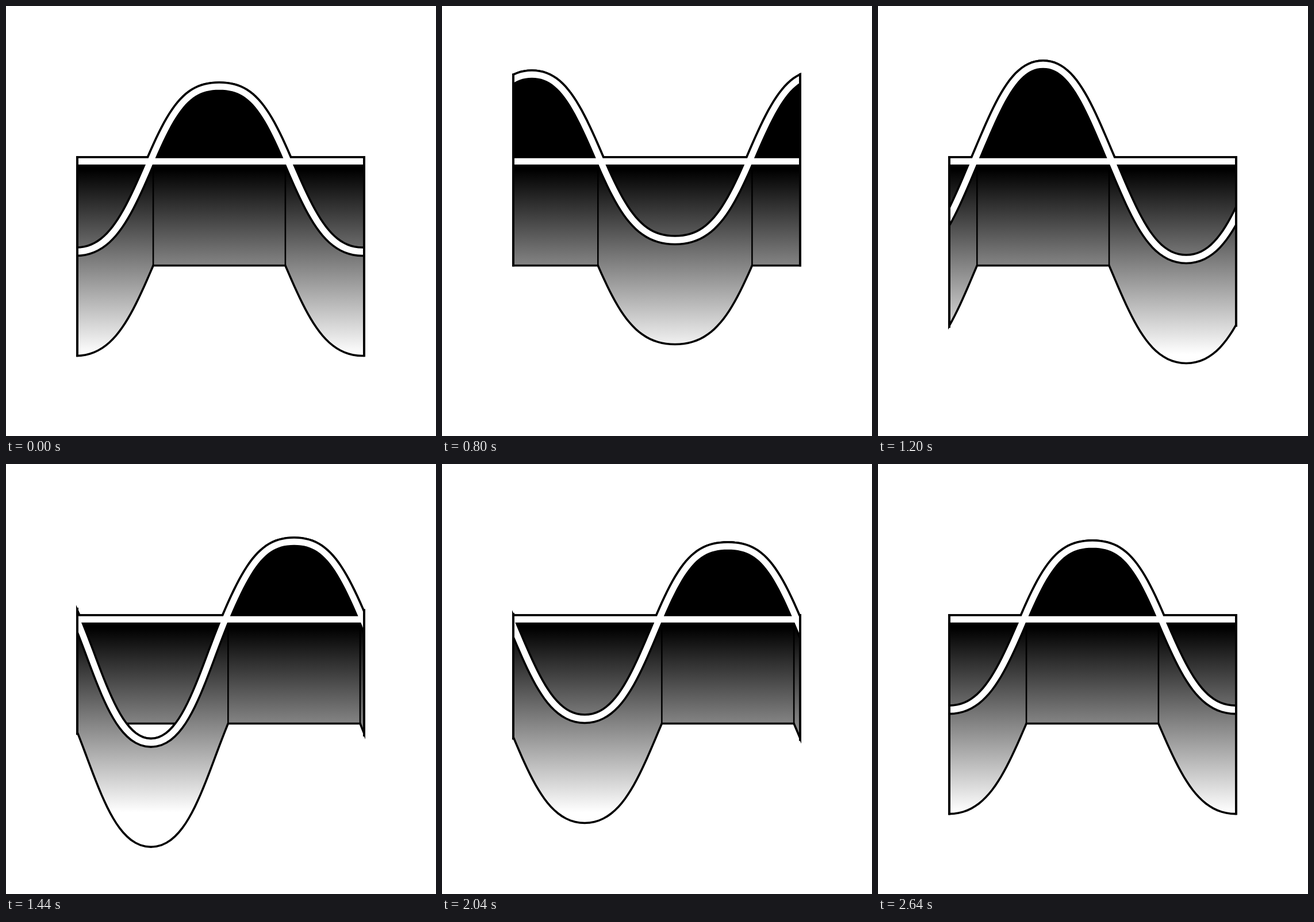
An HTML page that plays this animation: 748x748 px, repeating every 2.68 s.

```html
<!DOCTYPE html>
<html lang="en">
<head>
<meta charset="utf-8">
<title>Wave</title>
<style>
html, body { margin: 0; width: 100%; height: 100%; overflow: hidden; background: #fff; }
svg { display: block; width: 100vw; height: 100vh; }
</style>
</head>
<body>
<svg viewBox="0 0 748 748">
  <defs>
    <linearGradient id="shade" gradientUnits="userSpaceOnUse" x1="0" y1="285" x2="0" y2="606">
      <stop offset="0" stop-color="#000"/>
      <stop offset="1" stop-color="#fff"/>
    </linearGradient>
    <clipPath id="frame"><rect x="122" y="0" width="503" height="748"/></clipPath>
  </defs>
  <g clip-path="url(#frame)">
    <path id="bodyLine"/>
    <path id="bodyFill" fill="url(#shade)"/>
    <path id="folds" stroke="#000" stroke-width="2.6"/>
    <path id="bandLine"/>
    <path id="bandFill" fill="#fff"/>
    <path id="sides" stroke="#000" stroke-width="4"/>
  </g>
</svg>
<script>
const STEP = 40, STEPS = 67;
const LEFT = 124, RIGHT = 623, SPAN = 498, QUARTER = SPAN / 4;
const TOP = 263, THICK = 14.5, DROP = 174, HALF = 1.8;
const BASE = TOP + THICK + DROP;
// Bezier handles of a quarter wave: at the crossing and at the extreme
const RUN = 0.326 * QUARTER, RISE = 2.35 * RUN, REACH = 0.55 * QUARTER;

// [step, height] of the crest and depth of the trough
const CREST = [[0, 130], [10, 134], [20, 151], [28, 178], [30, 168], [36, 135], [42, 119], [51, 127], [60, 130], [67, 130]];
const TROUGH = [[0, 157], [10, 152], [20, 137], [26, 177], [30, 170], [37, 219], [42, 205], [51, 173], [60, 161], [67, 157]];

const el = id => document.getElementById(id);
const set = (id, d) => el(id).setAttribute('d', d);

function spline(keys, t) {
  const last = keys.length - 1;
  let i = 0;
  while (i < last - 1 && t >= keys[i + 1][0]) i++;
  const slope = j => j === 0 || j === last ? 0 :
    (keys[j + 1][1] - keys[j - 1][1]) / (keys[j + 1][0] - keys[j - 1][0]);
  const [t0, a] = keys[i], [t1, b] = keys[i + 1];
  const h = t1 - t0, s = (t - t0) / h, r = 1 - s;
  return a * (1 + 2 * s) * r * r + b * s * s * (3 - 2 * s) +
    h * s * r * (slope(i) * r - slope(i + 1) * s);
}

// Three wavelengths to the left per loop, slow at both ends
function crestX(n) {
  const a = 2 * Math.PI * n / STEPS;
  return 371 - (3 * SPAN * n / STEPS - 236 * Math.sin(a) + 14 * Math.sin(2 * a) - 3 * Math.sin(3 * a));
}

const bezier = (s, p1, p2, p3) => {
  const r = 1 - s;
  return 3 * r * r * s * p1 + 3 * r * s * s * p2 + s * s * s * p3;
};
const bezierSlope = (s, p1, p2, p3) => {
  const r = 1 - s;
  return 3 * (r * r * p1 + 2 * r * s * (p2 - p1) + s * s * (p3 - p2));
};

// One half wave as points [x, y, slope], s running -1..1 around its extreme
function lobe(mid, size, sign) {
  const pts = [];
  for (let i = -24; i < 24; i++) {
    const side = i < 0 ? 1 : -1, s = 1 - Math.abs(i / 24);
    const x = mid - side * (QUARTER - bezier(s, RUN, REACH, QUARTER));
    const dx = bezierSlope(s, RUN, REACH, QUARTER), dy = bezierSlope(s, RISE, size, size);
    pts.push([x, TOP + sign * bezier(s, RISE, size, size), side * sign * dy / dx]);
  }
  return pts;
}

function curve(n) {
  const up = spline(CREST, n), down = spline(TROUGH, n);
  const start = LEFT - 2 * SPAN + ((crestX(n) - LEFT) % SPAN + SPAN) % SPAN;
  const pts = [];
  for (let x = start; x < RIGHT + SPAN; x += SPAN) {
    pts.push(...lobe(x, up, -1), ...lobe(x + SPAN / 2, down, 1));
  }
  return pts;
}

// The curve pushed along its normal by d, then lowered by dy
const edge = (wave, d, dy = 0) => wave.map(([x, y, m]) => {
  const len = Math.hypot(1, m);
  return [x - d * m / len, y + d / len + dy];
});

const polygon = pts => 'M' + pts.map(p => p[0].toFixed(2) + ' ' + p[1].toFixed(2)).join('L') + 'Z';
const strip = (wave, a, b, dy = 0) => polygon(edge(wave, a).concat(edge(wave, b, dy).reverse()));
// Clockwise like strip, so that overlaps stay filled
const box = (y0, y1) => `M${LEFT - 2} ${y0}H${RIGHT + 2}V${y1}H${LEFT - 2}Z`;
const line = (x, y0, y1) => `M${x} ${y0}V${y1}`;

function yAt(pts, x) {
  let i = 1;
  while (i < pts.length - 1 && pts[i][0] < x) i++;
  const [x0, y0] = pts[i - 1], [x1, y1] = pts[i];
  return y0 + (y1 - y0) * (x - x0) / (x1 - x0);
}

function crossings(pts, y) {
  const out = [];
  for (let i = 1; i < pts.length; i++) {
    const [x0, y0] = pts[i - 1], [x1, y1] = pts[i];
    if ((y0 < y) !== (y1 < y)) out.push(x0 + (x1 - x0) * (y - y0) / (y1 - y0));
  }
  return out.filter(x => x > LEFT && x < RIGHT);
}

function draw(n) {
  const wave = curve(n);
  const inner = THICK - HALF, outer = THICK + HALF;

  set('bodyLine', strip(wave, -HALF, outer, DROP) + box(TOP - HALF, BASE + HALF));
  set('bodyFill', strip(wave, HALF, inner, DROP) + box(TOP + HALF, BASE - HALF));

  const bottom = edge(wave, THICK, DROP);
  set('folds', crossings(bottom, BASE).map(x => line(x, TOP + THICK, BASE)).join(''));

  set('bandLine', strip(wave, -HALF, outer) + box(TOP - HALF, TOP + outer));
  set('bandFill', strip(wave, HALF, inner) + box(TOP + HALF, TOP + inner));

  const roof = edge(wave, -HALF), floor = edge(wave, outer, DROP);
  set('sides', [LEFT, RIGHT].map(x =>
    line(x, Math.min(TOP - HALF, yAt(roof, x)), Math.max(BASE + HALF, yAt(floor, x)))).join(''));
}

const start = performance.now();
function tick() {
  draw(Math.floor((performance.now() - start) / STEP) % STEPS);
  requestAnimationFrame(tick);
}
draw(0);
requestAnimationFrame(tick);
</script>
</body>
</html>
```
